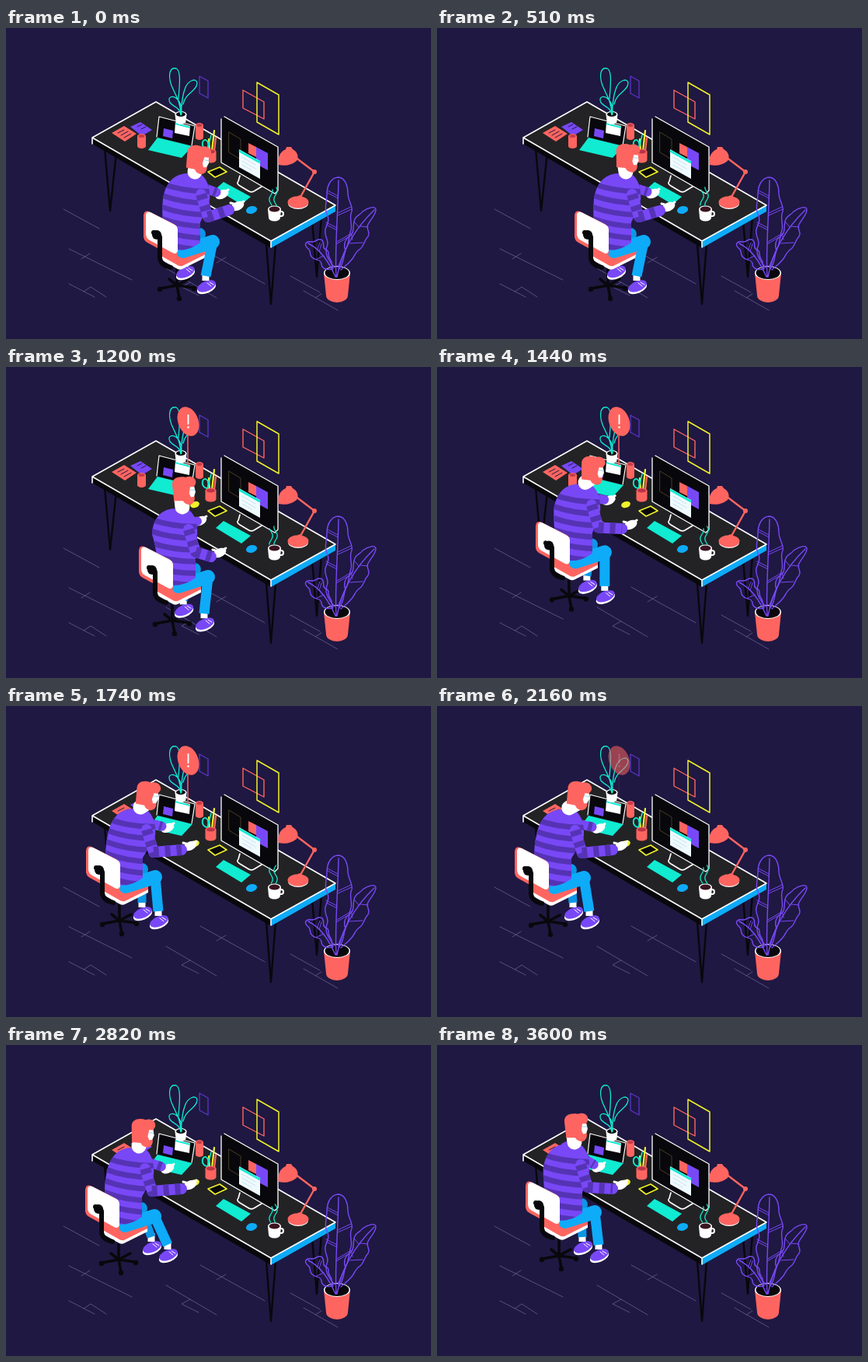
Write an HTML page with a canvas that moves like this. It is 547 by 400 pixels and loops after 3.63 s.

```html
<!DOCTYPE html>
<html lang="en">
<head>
<meta charset="utf-8">
<style>
  html, body { margin: 0; width: 100%; height: 100%; overflow: hidden; background: #1f1842; }
  canvas { display: block; }
</style>
</head>
<body>
<canvas id="stage" width="547" height="400"></canvas>
<script>
const ctx = document.getElementById('stage').getContext('2d');
const LOOP = 3630;
const BG = '#1f1842', RED = '#ff6560', TEAL = '#10ebd2', PURPLE = '#7848f6', DARK = '#5533b4',
  BLUE = '#0eabf8', YELLOW = '#f0f22a', WHITE = '#fff', BLACK = '#08080c', TOP = '#232325', FLOOR = '#575083';

function fill(d, color) {
  ctx.fillStyle = color;
  ctx.fill(new Path2D(d));
}
function line(d, color, width = 1.4, cap = 'round') {
  ctx.strokeStyle = color;
  ctx.lineWidth = width;
  ctx.lineCap = cap;
  ctx.lineJoin = 'round';
  ctx.stroke(new Path2D(d));
}
function oval(x, y, rx, ry, color, angle = 0) {
  ctx.fillStyle = color;
  ctx.beginPath();
  ctx.ellipse(x, y, rx, ry, angle, 0, 7);
  ctx.fill();
}
function cylinder(x, y, rx, ry, height, color, inner, taper = 0, rim = color) {
  const b = rx - taper;
  fill(`M${x - rx} ${y}L${x - b} ${y + height}A${b} ${ry} 0 0 0 ${x + b} ${y + height}L${x + rx} ${y}Z`, color);
  oval(x, y, rx, ry, rim);
  oval(x, y, rx - 1.5, ry - 1, inner);
}

// Value of a keyed track [time, ...values], a smooth curve without overshoot
function at(keys, t) {
  const last = keys.length - 1;
  if (t <= keys[0][0]) return keys[0].slice(1);
  if (t >= keys[last][0]) return keys[last].slice(1);
  const slope = (n, j) => n < 1 || n > last ? 0 : (keys[n][j] - keys[n - 1][j]) / (keys[n][0] - keys[n - 1][0]);
  const tangent = (n, j) => {
    const a = slope(n, j), b = slope(n + 1, j);
    return a * b > 0 ? 2 * a * b / (a + b) : 0;
  };
  const i = keys.findIndex(k => k[0] > t), from = keys[i - 1], to = keys[i];
  const span = to[0] - from[0], u = (t - from[0]) / span;
  return from.slice(1).map((p, k) => {
    const d = to[k + 1] - p, m0 = tangent(i - 1, k + 1) * span, m1 = tangent(i, k + 1) * span;
    return p + u * m0 + u * u * (3 * d - 2 * m0 - m1) + u ** 3 * (m0 + m1 - 2 * d);
  });
}

const tracks = {
  chair: [[850, 0, 0], [1200, -6, -5], [1620, -76, -55], [1740, -74, -55], [2160, -77, -54], [2820, -75, -55], [3240, -63, -60]],
  lean: [[700, 0], [1200, -10], [1640, 4], [2820, 3], [3240, -3]],
  head: [[0, 247, 168], [510, 245, 166], [1200, 229, 158], [1640, 182, 114], [2160, 182, 114], [2820, 176, 112], [3240, 177, 107], [3600, 179, 105]],
  tilt: [[0, .2], [510, .1], [1200, 0], [1640, .2], [2160, .2], [2820, .1], [3600, 0]],
  nearHand: [[700, 298, 229], [1200, 275, 239], [1620, 237, 180]],
  farHand: [[700, 278, 214], [1200, 250, 198], [1620, 208, 158]],
  nearFoot: [[1150, 258, 332], [1620, 197, 277], [2220, 197, 277], [2730, 209, 270]],
  farFoot: [[1150, 231, 314], [1620, 176, 266], [2220, 176, 266], [2730, 188, 260]]
};

function drawRoom() {
  line('M74 233L120 258M81 284L162 324M97 297L108 290M81 329L114 346M100 339L109 333L129 346', FLOOR, 1);
  line('M250 283L333 329M271 302L283 295M206 309L271 347M237 327L226 333L248 344', FLOOR, 1);
  line('M366 319L404 340M383 338L427 363M398 347L406 342', FLOOR, 1);
  line('M249 62L260 68V90L249 84Z', '#5b35c8', 1.3);
  line('M305 80L332 95V117L305 103Z', RED, 1.4);
  line('M323 70L351 86V137L323 121Z', YELLOW, 1.5);
}

function drawDesk() {
  line('M127 155L134 235L142 160M335 278L341 355L347 278M394 248L400 320L406 242', BLACK, 2.4);
  fill('M111 141L341 275V283L111 149Z', BLACK);
  fill('M341 274L424 228V236L341 283Z', BLUE);
  fill('M111 141L193 95L424 228L341 274Z', TOP);
  line('M111 141L193 95L424 228L341 274ZM111 141V149M341 274V282', WHITE, 1.6);
}

function drawLaptop() {
  fill('M160 127L173 121L188 131L175 139Z', PURPLE);
  fill('M136 135L152 126L168 136L153 146Z', RED);
  line('M144 135L152 131M148 138L157 133M152 141L161 136M169 127L175 124M174 130L180 127', BG, 1);
  cylinder(174.5, 139, 5.5, 3, 13, RED, '#c83d4a');
  cylinder(249, 125, 5, 3, 16, RED, '#c83d4a');
  fill('M183 157L195 141L240 152L226 167Z', TEAL);
  fill('M197 114L243 126L239 151L194 140Z', BLACK);
  line('M194 140L197 114L243 126L239 151', WHITE, 1.2);
  fill('M203 129L215 132L214 142L202 139Z', PURPLE);
  fill('M218 121L237 126L236 139L217 135Z', WHITE);
  line('M218 123L237 128', TEAL, 2, 'butt');
}

function drawSmallPlant() {
  cylinder(225, 111, 7.5, 4, 9, WHITE, BLACK, 1);
  line('M225 112C225 96 219 88 213 74C208 60 211 50 219 52C226 55 223 76 222 91M225 112C226 101 226 90 230 79C234 66 246 64 246 71C245 82 231 83 228 98M225 112C223 101 217 103 211 96C207 88 215 86 221 92C226 98 226 104 226 111', TEAL, 1.3);
}

function drawMonitor() {
  line('M301 190L299 197Q296 200 301 203L311 209Q315 212 319 210L329 204', WHITE, 1.7);
  fill('M277 117L281 114L350 152V209L346 213L277 173Z', BLACK);
  line('M277 117V173L346 213L350 209V153L281 114', WHITE, 1.3);
  line('M287 134L302 143V169L287 160Z', '#493b28', 1);
  fill('M312 148L322 153V166L312 161Z', RED);
  fill('M322 153L337 161V183L322 175Z', PURPLE);
  fill('M300 156L327 171V194L300 179Z', '#eefaff');
  line('M300 158L327 173', TEAL, 3, 'butt');
  line('M304 166L321 176M304 171L321 181M304 176L316 183', '#c6d8e4', .8);
}

function drawDeskItems() {
  oval(243, 177, 6, 4, YELLOW, -.3);
  line('M262 158L261 143M265 158L268 132', YELLOW, 2.2);
  line('M268 158L270 141', RED, 2.2);
  line('M259 158L264 138', TEAL, 1.6);
  line('M259 156C250 154 252 143 257 144C262 146 260 152 260 156', TEAL, 1.8);
  cylinder(263.5, 159, 7, 3.5, 11, RED, '#b93447');
  fill('M260 185L275 179L284 185L269 192Z', BLACK);
  line('M260 185L275 179L284 185L269 192Z', YELLOW, 1.6);
  fill('M270 207L280 198L315 217L303 227Z', TEAL);
  oval(316, 234, 7.2, 4.8, BLUE, -.25);
}

function drawLamp() {
  oval(376, 225.5, 13, 7.5, '#fff');
  oval(376, 224, 13.5, 7.8, RED);
  line('M378 219L397 185L372 166', RED, 2.4);
  oval(397, 185, 3, 3, RED);
  oval(378, 218, 2.8, 2.8, RED);
  fill('M351 176C349 166 353 159 360 156L361 153H367L369 156C376 160 377 166 374 171Q364 179 351 176Z', RED);
}

function drawMug(t) {
  oval(354, 239, 4, 4, WHITE);
  oval(354, 239, 2, 2, TOP);
  cylinder(345.5, 233, 8.5, 4.5, 11, WHITE, '#3a1420', 1);
  for (const [x, top] of [[341, 208], [347, 205]]) {
    let d = '';
    for (let y = top; y <= 229; y += 2)
      d += `${d ? 'L' : 'M'}${x + 2.2 * Math.sin(y / 3.6 + t * Math.PI * 10 / LOOP)} ${y}`;
    line(d, TEAL, 1.3);
  }
}

function drawBigPlant() {
  cylinder(426, 315, 17, 9, 29, RED, BLACK, 3, WHITE);
  line('M425 320C423 285 427 245 428 196M426 320C432 288 447 260 474 234M424 320C415 300 405 285 389 277', PURPLE);
  // Upright, right and left leaf
  line('M423 308C413 297 410 289 413 281C417 274 409 268 411 259C414 250 417 247 413 239C409 231 413 224 413 214C413 200 420 192 428 192C437 193 440 204 440 213C440 222 447 229 445 236C441 243 446 252 444 260C441 267 442 277 437 285C433 293 431 301 427 308', PURPLE);
  line('M429 310C435 302 434 294 437 286C434 279 436 272 442 268C449 264 446 256 448 249C449 241 456 241 459 236C466 231 476 228 476 234C476 241 467 248 465 255C465 261 469 263 466 268C461 273 461 280 456 284C449 288 449 294 444 299C439 305 435 307 431 311', PURPLE);
  line('M420 310C412 312 406 309 406 303C404 296 399 300 394 295C389 291 394 287 388 283C383 278 386 274 393 275C399 276 401 269 407 273C411 278 406 282 411 285C418 287 413 293 417 297C421 302 418 306 421 310', PURPLE);
  line('M427 216L414 209M427 219L414 212M427 238L444 230M427 241L445 233M426 257L412 250M426 260L412 253M426 275L443 265M425 278L442 268M446 272L444 264M455 257L448 249M456 255L466 256M443 277L459 276M403 287L406 278M401 285L404 276M409 293L400 297', PURPLE, 1);
}

function drawAlert(t) {
  if (t < 700 || t > 2260) return;
  const x = Math.min(1, (t - 700) / 400) - 1;
  const rise = 1 + 4.4 * x ** 3 + 3.4 * x * x;
  const y = 126 - 56 * rise, size = Math.max(0, Math.min(1, rise));
  const fade = t < 2080 ? 1 : (2260 - t) / 180;
  ctx.save();
  ctx.globalAlpha = fade ** 4;
  line(`M234 126V${y}`, RED, 1.5);
  ctx.globalAlpha = fade;
  ctx.translate(234.5, y);
  ctx.scale(size, size);
  oval(0, 0, 13, 19.5, RED, -.36);
  ctx.globalAlpha = fade ** 3;
  line('M0 -8V3', WHITE, 1.9);
  oval(0, 7.5, 1.3, 1.3, WHITE);
  ctx.restore();
}

function drawShoe([x, y]) {
  oval(x, y + 2.5, 12.8, 6.5, WHITE, -.4);
  oval(x, y, 12.5, 6.5, PURPLE, -.4);
  line(`M${x + 1} ${y - 4}l5 4M${x + 4} ${y - 5}l5 3`, WHITE, 1);
}

function drawLeg(hip, knee, [x, y], color, width) {
  drawShoe([x, y]);
  line(`M${x - 1} ${y - 18}V${y - 7}`, WHITE, 9, 'butt');
  line(`M${hip}L${knee}`, color, width);
  line(`M${knee}L${x - 1} ${y - 13}`, color, width - 5, 'butt');
}

function drawSleeve(d, width) {
  line(d, PURPLE, width);
  ctx.setLineDash([7, 8]);
  line(d, DARK, width, 'butt');
  ctx.setLineDash([]);
}

function drawHand([x, y]) {
  oval(x, y, 9, 5.5, WHITE, -.45);
  line(`M${x - 2} ${y - 2}l-7 -2M${x + 3} ${y - 3}l5 -3`, WHITE, 3);
}

function drawChairBase() {
  line('M220 300V331M220 331L199 335M220 331L223 347M220 331L241 334M220 331L235 323M220 331L210 323', BLACK, 3.6);
  for (const [x, y] of [[198, 336], [223, 348], [242, 335]]) oval(x, y, 3.2, 3.2, BLACK);
}

function drawSeat() {
  fill('M196 288L228 273L257 289V295L227 310Q223 312 219 309L196 296Z', WHITE);
  fill('M196 285L228 270L257 287V291L227 306Q223 307 219 304L196 291Z', RED);
}

function drawBackrest() {
  fill('M177 241Q178 234 184 236L216 252Q221 255 221 260V289Q220 296 213 293L182 276Q177 273 177 268Z', RED);
  fill('M180 240Q181 235 186 237L217 253Q221 255 221 260V286Q220 292 214 289L185 273Q180 270 180 265Z', WHITE);
  line('M190 263Q199 264 198 272V296Q199 305 212 308', BLACK, 6);
  oval(194, 266, 6, 6, BLACK);
}

function drawTorso(lean) {
  const body = new Path2D(`M${231 + lean} 187C${215 + lean} 189 ${205 + lean} 200 ${202 + lean * .8} 220
    C200 240 202 262 208 284Q232 290 250 276L250 250L${262 + lean} 224Q${264 + lean} 200 ${252 + lean} 189Z`);
  ctx.save();
  ctx.fillStyle = PURPLE;
  ctx.fill(body);
  ctx.clip(body);
  for (let y = 198; y < 290; y += 15) line(`M${195 + lean} ${y}Q${228 + lean} ${y + 14} ${270 + lean} ${y + 12}`, DARK, 7);
  ctx.restore();
}

function drawHead([x, y], tilt, neckX, neckY) {
  line(`M${x - 3} ${y + 12}L${neckX} ${neckY}`, WHITE, 19);
  ctx.save();
  ctx.translate(x, y);
  ctx.rotate(tilt);
  ctx.scale(1.15, .95);
  fill('M4 -9L11 -7L13 3L11 11L3 16Z', WHITE);
  fill('M-13 -6C-14 -15 -7 -19 2 -17C9 -21 15 -14 13 -8L11 -4L7 -4L6 5L8 10L12 9Q13 18 7 20Q1 20 -1 15L-11 15Z', RED);
  line('M7 0H12', '#8fd8ee', 1);
  ctx.restore();
}

function drawPerson(t) {
  const p = {};
  for (const name in tracks) p[name] = at(tracks[name], t);
  const [cx, cy] = p.chair, [lean] = p.lean;
  const rel = (x, y) => [x + cx, y + cy];
  const onChair = (draw, ...args) => {
    ctx.save();
    ctx.translate(cx, cy);
    draw(...args);
    ctx.restore();
  };
  const tap = 1.3 * Math.sin(t / 38);
  if (t < 700) {
    p.nearHand[1] += tap;
    p.farFoot[1] -= Math.abs(Math.sin(t / 90));
  }
  if (t < 700 || t > 1700) p.farHand[1] -= tap;

  const [fx, fy] = p.farHand, [nx, ny] = p.nearHand;
  const [sx, sy] = rel(253 + lean, 205), elbow = rel(260 + lean, 243);

  onChair(drawChairBase);
  drawLeg(rel(232, 280), rel(249, 265), p.farFoot, '#0b97e6', 16);
  onChair(drawSeat);
  drawLeg(rel(228, 287), rel(266, 275), p.nearFoot, BLUE, 18);
  drawHand(p.farHand);
  drawSleeve(`M${sx} ${sy}L${sx + (fx - sx) * .7} ${sy + (fy - sy) * .7}`, 12);
  onChair(drawTorso, lean);
  drawHand(p.nearHand);
  drawSleeve(`M${rel(251 + lean, 214)}L${elbow}L${nx - 11} ${ny + 5}`, 14);
  drawHead(p.head, p.tilt[0], ...rel(243 + lean, 185));
  onChair(drawBackrest);
}

function frame(now) {
  const t = now % LOOP;
  fill('M0 0H547V400H0Z', BG);
  drawRoom();
  drawDesk();
  drawLaptop();
  drawSmallPlant();
  drawDeskItems();
  drawMonitor();
  drawLamp();
  drawMug(t);
  drawBigPlant();
  drawAlert(t);
  drawPerson(t);
  requestAnimationFrame(frame);
}
frame(0);
</script>
</body>
</html>
```
